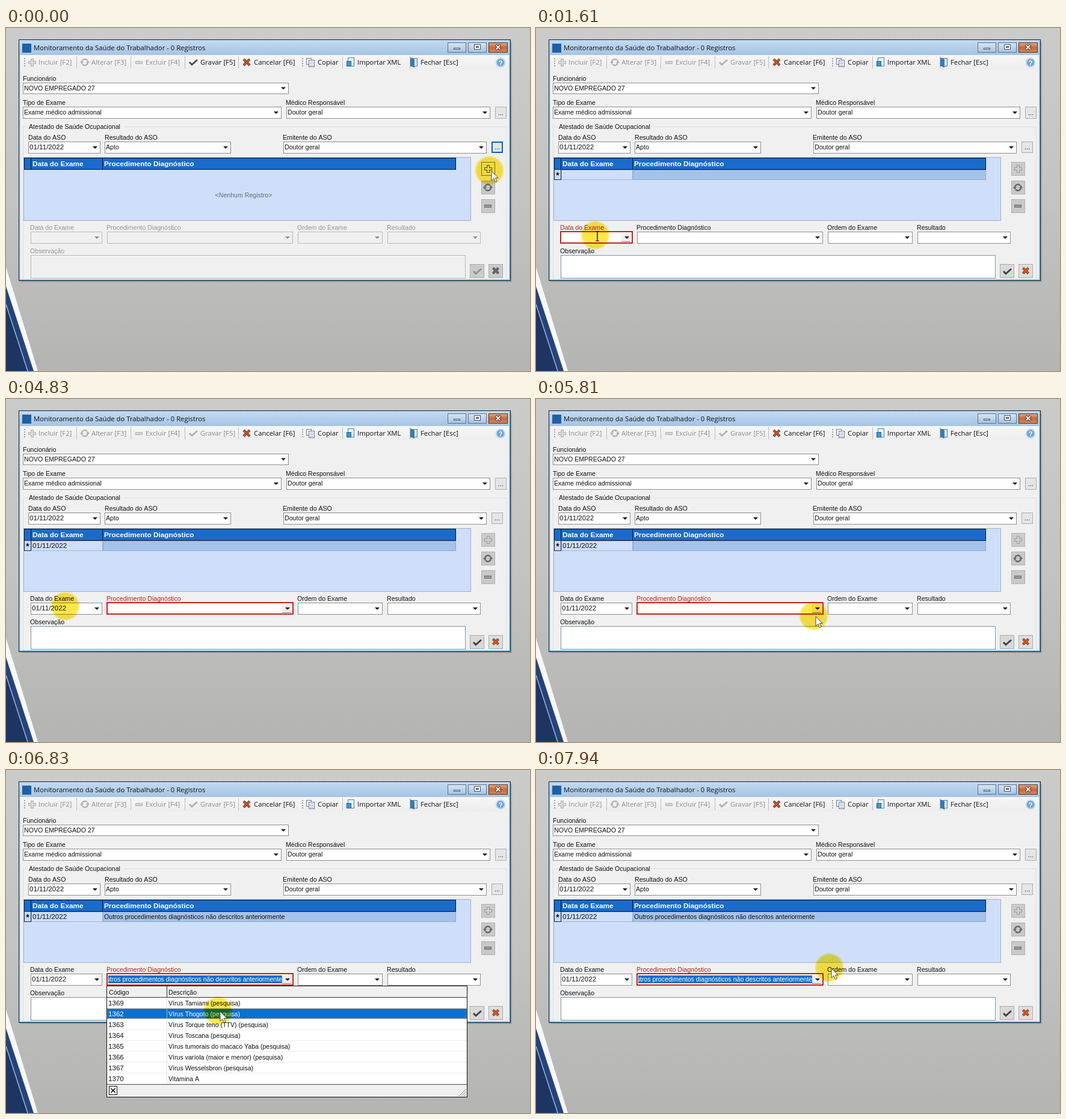
Recreate the animation shown at these times as an HTML page with a canvas. Size 871 by 571 pixels, loop 8000 ms.

```html
<!DOCTYPE html>
<html lang="pt-BR">
<head>
<meta charset="utf-8">
<title>Saúde do Trabalhador</title>
<style>
html, body { margin: 0; width: 100%; height: 100%; overflow: hidden; background: #bdbdbc; }
canvas { display: block; }
</style>
</head>
<body>
<canvas id="stage" width="871" height="571"></canvas>
<script>
const ctx = document.getElementById('stage').getContext('2d');
const LOOP = 8000;
const SANS = '"Liberation Sans", Arial, sans-serif';
const FORM = '10.6px ' + SANS;
const NUM = '11.6px ' + SANS;
const BOLD = 'bold 11.8px ' + SANS;
const UI = '11.3px "Open Sans", "Noto Sans", sans-serif';
const EMPLOYEE = 'NOVO EMPREGADO 27';
const DOCTOR = 'Doutor geral';
const DATE = '01/11/2022';
const EXAM = 'Outros procedimentos diagnósticos não descritos anteriormente';
const RED = '#c9201c';
const LABEL_RED = '#b3221f';
const SELECTED = '#0b70d0';

// Moments of the story, in ms
const ADD = 80, FOCUS = 1000, TYPING = 1680, TAB = 4830, OPEN = 6150, CLOSE = 7520;
const BLINK = 530;
const KEYS = [TYPING, 2310, 2870, 3290, 3430, 3640, 3990, 4270, 4340, 4410];
// Pointer tip: time, x, y
const PATH = [
  [0, 807, 238], [130, 807, 238], [420, 46, 399], [500, 52, 393],
  [FOCUS, 102, 346], [5330, 102, 346], [5700, 450, 373], [5810, 465, 362],
  [5960, 468, 352], [6200, 468, 352], [6780, 356, 402], [7100, 356, 402],
  [7440, 464, 352], [7660, 467, 348], [7940, 491, 330], [LOOP, 495, 328]
];
const ROWS = [
  ['1369', 'Vírus Tamiami (pesquisa)'],
  ['1362', 'Vírus Thogoto (pesquisa)'],
  ['1363', 'Vírus Torque teno (TTV) (pesquisa)'],
  ['1364', 'Vírus Toscana (pesquisa)'],
  ['1365', 'Vírus tumorais do macaco Yaba (pesquisa)'],
  ['1366', 'Vírus varíola (maior e menor) (pesquisa)'],
  ['1367', 'Vírus Wesselsbron (pesquisa)'],
  ['1370', 'Vitamina A']
];

function rect(x, y, w, h, fill, stroke) {
  if (fill) { ctx.fillStyle = fill; ctx.fillRect(x, y, w, h); }
  if (stroke) {
    ctx.strokeStyle = stroke;
    ctx.lineWidth = 1;
    ctx.strokeRect(x + .5, y + .5, w - 1, h - 1);
  }
}

function text(str, x, y, color = '#111', font = FORM, align = 'left') {
  ctx.font = font;
  ctx.fillStyle = color;
  ctx.textAlign = align;
  ctx.fillText(str, x, y);
}

function shape(points, fill) {
  ctx.beginPath();
  points.forEach(([x, y]) => ctx.lineTo(x, y));
  ctx.closePath();
  ctx.fillStyle = fill;
  ctx.fill();
}

function line(points, color, width = 1) {
  ctx.beginPath();
  points.forEach(([x, y]) => ctx.lineTo(x, y));
  ctx.strokeStyle = color;
  ctx.lineWidth = width;
  ctx.stroke();
}

function shade(x0, y0, x1, y1, ...colors) {
  const g = ctx.createLinearGradient(x0, y0, x1, y1);
  colors.forEach((c, i) => g.addColorStop(i / (colors.length - 1), c));
  return g;
}

function mix(a, b, k) {
  k = Math.min(1, Math.max(0, k));
  return `rgb(${a.map((v, i) => Math.round(v + (b[i] - v) * k))})`;
}

function cross(x, y, r, color, width = 3) {
  line([[x - r, y - r], [x + r, y + r]], color, width);
  line([[x - r, y + r], [x + r, y - r]], color, width);
}

function check(x, y, color) {
  line([[x - 6, y], [x - 2, y + 4], [x + 7, y - 4]], color, 3);
}

function plus(x, y, fill, edge) {
  rect(x - 6, y - 2, 13, 5, edge);
  rect(x - 2, y - 6, 5, 13, edge);
  rect(x - 5, y - 1, 11, 3, fill);
  rect(x - 1, y - 5, 3, 11, fill);
}

function minus(x, y, fill, edge) {
  rect(x - 6, y - 2, 12, 5, fill, edge);
}

function cycle(x, y, color) {
  ctx.strokeStyle = color;
  ctx.lineWidth = 2.5;
  for (const a of [.2, Math.PI + .2]) {
    ctx.beginPath();
    ctx.arc(x, y, 5, a, a + 2.2);
    ctx.stroke();
  }
  shape([[x - 8, y - 1], [x - 2, y - 1], [x - 5, y + 4]], color);
  shape([[x + 8, y + 1], [x + 2, y + 1], [x + 5, y - 4]], color);
}

function button(x, y, w, h, fill = '#c9c9c9', edge = '#b0b0b0') {
  rect(x, y, w, h, fill, edge);
}

function combo(x, y, right, value, { off, focus, font, h = 20 } = {}) {
  const w = right - x;
  rect(x, y, w, h, off ? '#f0f0f0' : '#fff', off ? '#b9b9b9' : '#8b8d92');
  if (focus) {
    rect(right - 18, y + 3, 15, h - 6, '#f0f0f0');
    line([[right - 18, y + h - 3.5], [right - 3, y + h - 3.5]], '#777');
    ctx.strokeStyle = RED;
    ctx.lineWidth = 2;
    ctx.strokeRect(x, y, w, h - 1);
  }
  const ax = right - 9, ay = y + h / 2 - 1;
  shape([[ax - 4, ay - 1], [ax + 4, ay - 1], [ax, ay + 3]], off ? '#8c8c8c' : '#111');
  if (value) text(value, x + 2, y + h / 2 + 3, '#111', font);
}

function backdrop() {
  rect(0, 0, 871, 571, shade(0, 0, 0, 571, '#cbcbca', '#c3c3c2', '#b4b4b3'));
  shape([[0, 398], [53, 571], [0, 571]], '#f7f8fa');
  shape([[0, 430], [46, 571], [0, 571]], '#24437c');
  line([[0, 460], [36, 571]], '#a9b8d2', 1.5);
  shape([[0, 463], [35, 571], [0, 571]], '#1d3562');
}

function frame() {
  rect(24, 23, 817, 400, 'rgba(0,0,0,.14)');
  rect(21, 19, 818, 402, '#b5d0ec', '#17202a');
  rect(22, 20, 816, 25, shade(0, 20, 0, 45, '#c3daf2', '#a5c4e4'));
  rect(24, 45, 812, 373, '#f0f0f0');
  line([[837.5, 20], [837.5, 419.5], [22, 419.5]], '#55bfe5');
  rect(27, 26, 15, 15, '#1f5fa6');
  text('Monitoramento da Saúde do Trabalhador - 0 Registros', 46, 37, '#111', UI);

  for (const x of [734, 768]) {
    rect(x, 24, 31, 17, shade(0, 24, 0, 41, '#d8e7f7', '#a4c1e0'), '#5d7188');
  }
  rect(802, 24, 32, 17, shade(0, 24, 0, 41, '#e2b091', '#c8683a', '#d58a5c'), '#59301f');
  rect(744, 33, 11, 3, '#fff', '#46505b');
  rect(778, 27, 11, 9, '#fff', '#46505b');
  rect(781, 30, 5, 3, '#8ca6c0', '#46505b');
  cross(818, 32, 4, '#54302a', 4);
  cross(818, 32, 3.5, '#fff', 2);
}

function toolbar(editing) {
  const off = '#8c8c8c', on = '#111';
  rect(24, 45, 812, 24, shade(0, 45, 0, 69, '#f7f7f7', '#ededed'));
  for (const x of [30, 492]) {
    for (let y = 50; y < 65; y += 4) rect(x, y, 2, 2, '#a2a2a2');
  }
  for (const x of [117, 207, 297, 386, 559, 671]) rect(x, 47, 1, 20, '#bdbdbd');

  plus(43, 57, '#d8d8d8', '#b2b2b2');
  cycle(131, 57, '#b4b4b4');
  minus(221, 57, '#d4d4d4', '#b2b2b2');
  check(311, 57, editing ? '#b2b2b2' : '#505050');
  cross(400, 57, 5, '#6e2e18', 4);
  cross(400, 57, 4.5, '#bd572c', 2.5);

  rect(499, 50, 9, 11, '#fff', '#687a91');
  rect(503, 53, 10, 12, '#f4f8fc', '#687a91');
  for (const y of [56, 59, 62]) rect(505, y, 6, 1, '#91a4ba');
  rect(568, 49, 11, 15, '#eaf5fd', '#3d83b8');
  rect(566, 55, 8, 9, '#3d98d1', '#23628e');
  rect(672, 50, 12, 14, '#dbe9f3', '#537695');
  shape([[672, 49], [679, 52], [679, 66], [672, 63]], '#397bb2');

  const items = [
    ['Incluir [F2]', 54, off], ['Alterar [F3]', 142, off], ['Excluir [F4]', 232, off],
    ['Gravar [F5]', 323, editing ? off : on], ['Cancelar [F6]', 412, on],
    ['Copiar', 518, on], ['Importar XML', 584, on], ['Fechar [Esc]', 689, on]
  ];
  items.forEach(([label, x, color]) => text(label, x, 61, color, UI));

  ctx.beginPath();
  ctx.arc(822, 57.5, 7, 0, 7);
  ctx.fillStyle = '#6ea3d6';
  ctx.fill();
  ctx.strokeStyle = '#b9d2ea';
  ctx.lineWidth = 2;
  ctx.stroke();
  text('?', 822, 61.5, '#fff', 'bold 11px ' + SANS, 'center');
}

function header(editing) {
  text('Funcionário', 28, 88);
  combo(28, 91, 470, EMPLOYEE, { h: 19 });
  text('Tipo de Exame', 28, 128);
  combo(28, 131, 458, 'Exame médico admissional');
  text('Médico Responsável', 465, 128);
  combo(466, 131, 805, DOCTOR);
  button(813, 131, 19, 20, '#e5e5e5', '#adadad');
  text('...', 822.5, 145, '#111', FORM, 'center');

  line([[35, 164.5], [28.5, 164.5], [28.5, 417]], '#dedede');
  line([[196, 164.5], [831.5, 164.5], [831.5, 417]], '#dedede');
  text('Atestado de Saúde Ocupacional', 38, 168);
  text('Data do ASO', 37, 186);
  combo(37, 189, 157, DATE, { font: NUM });
  text('Resultado do ASO', 164, 186);
  combo(164, 189, 374, 'Apto');
  text('Emitente do ASO', 460, 186);
  combo(461, 189, 799, DOCTOR);
  button(807, 189, 19, 19, '#e5e5e5', '#adadad');
  if (!editing) {
    rect(807, 189, 19, 19, '#0a62bd');
    rect(809, 191, 15, 15, '#e1e6ec');
  }
  text('...', 816.5, 202, '#111', FORM, 'center');
}

function grid(t, editing) {
  rect(29, 215, 744, 106, '#cfdffa', '#9fb1c9');
  rect(30, 216, 718, 20, '#1a6bcb', '#06132a');
  rect(41, 217, 1, 18, '#06132a');
  rect(160, 217, 1, 18, '#06132a');
  text('Data do Exame', 44, 230, '#fff', BOLD);
  text('Procedimento Diagnóstico', 163, 230, '#fff', BOLD);
  if (!editing) {
    text('<Nenhum Registro>', 395, 282, '#626b78', FORM, 'center');
    return;
  }
  rect(161, 236, 587, 17, '#a5c2eb', '#8eabd2');
  rect(42, 236, 119, 17, '#cfdffa', '#9db6d7');
  rect(30, 235, 12, 18, '#c9daf2', '#0c2d5c');
  text('*', 36, 250, '#111', 'bold 14px ' + SANS, 'center');
  if (t >= TAB) text(DATE, 44, 248, '#111', NUM);
  if (t >= OPEN) text(EXAM, 163, 248);
}

function sideButtons(editing) {
  button(790, 223, 23, 23, editing ? '#cbcbcb' : '#f0f0ec', editing ? '#b4b4b4' : '#777');
  plus(801, 234, editing ? '#d0d0d0' : '#e8e8e8', editing ? '#999' : '#555');
  button(790, 254, 23, 23);
  cycle(801, 265.5, '#666');
  button(790, 285, 23, 23);
  minus(801, 296, '#999', '#6e6e6e');
}

function caretOn(t) {
  const last = [ADD, FOCUS, ...KEYS].filter(k => k <= t).pop();
  return Math.floor((t - last) / BLINK) % 2 === 0;
}

function details(t, editing) {
  const dateFocus = editing && t < TAB;
  const examFocus = t >= TAB;
  const ink = editing ? '#111' : '#969696';
  const off = !editing;

  text('Data do Exame', 40, 336, dateFocus ? LABEL_RED : ink);
  text('Procedimento Diagnóstico', 167, 336, examFocus ? LABEL_RED : ink);
  text('Ordem do Exame', 484, 336, ink);
  text('Resultado', 633, 336, ink);
  text('Observação', 40, 375, ink);

  combo(41, 339, 160, examFocus ? DATE : '', { off, focus: dateFocus, font: NUM });
  combo(168, 339, 477, '', { off, focus: examFocus });
  combo(485, 339, 626, '', { off });
  combo(634, 339, 789, '', { off });
  rect(41, 378, 723, 39, off ? '#f0f0f0' : '#fff', off ? '#b9b9b9' : '#7f93a5');

  if (dateFocus) {
    const typed = DATE.slice(0, KEYS.filter(k => t >= k).length);
    text(typed, 43, 352, '#111', NUM);
    const x = 43 + ctx.measureText(typed).width;
    if (caretOn(t)) rect(Math.round(x), 342, 1, 13, '#111');
  }
  if (t >= OPEN) {
    rect(170, 342, 289, 13, SELECTED);
    ctx.save();
    ctx.beginPath();
    ctx.rect(170, 340, 289, 17);
    ctx.clip();
    text(EXAM, 459, 352, '#fff', FORM, 'right');
    ctx.restore();
  }

  const k = (t - 300) / 900;
  button(771, 393, 24, 23, off ? '#cbcbcb' : '#d9d9d9', '#ababab');
  check(783, 405, off ? '#929292' : mix([125, 125, 125], [65, 65, 65], k));
  button(802, 393, 24, 23, off ? '#cbcbcb' : '#dedede', '#ababab');
  cross(814, 404, 4.5, off ? '#484848' : '#60351f', 4);
  cross(814, 404, 4, off ? '#6b6b6b' : mix([164, 116, 67], [224, 83, 29], k), 2.5);
}

function list(y) {
  const hover = Math.min(7, Math.max(0, Math.floor((y - 379) / 18)));
  rect(167, 359, 600, 186, '#fff', '#111');
  rect(168, 360, 598, 19, '#f0f0f0');
  line([[168, 378.5], [766, 378.5]], '#333');
  rect(267, 360, 1, 18, '#333');
  text('Código', 171, 374);
  text('Descrição', 270, 374);
  ROWS.forEach(([code, name], i) => {
    const top = 379 + i * 18;
    const on = i === hover;
    rect(168, top + 17, 598, 1, '#ececec');
    rect(267, top, 1, 18, '#e2e2e2');
    if (on) {
      rect(168, top, 598, 17, SELECTED);
      rect(267, top, 1, 17, '#8db5e2');
      ctx.setLineDash([1, 1]);
      rect(168, top, 598, 17, null, '#d79a4b');
      ctx.setLineDash([]);
    }
    text(code, 170, top + 13, on ? '#fff' : '#111', NUM);
    text(name, 270, top + 13, on ? '#fff' : '#111');
  });
  rect(168, 523, 598, 21, '#f0f0f0');
  line([[168, 523.5], [766, 523.5]], '#555');
  rect(171, 526, 14, 15, '#fff', '#111');
  cross(178, 533.5, 3.5, '#111', 1.7);
  for (const d of [3, 7, 11]) line([[764 - d, 543], [764, 543 - d]], '#888');
}

// Speed at a path point: zero at rests and turns, so the curve never overshoots
function speed(i, axis) {
  if (i === 0 || i === PATH.length - 1) return 0;
  const slope = j => (PATH[j + 1][axis] - PATH[j][axis]) / (PATH[j + 1][0] - PATH[j][0]);
  const a = slope(i - 1), b = slope(i);
  return a * b > 0 ? 2 * a * b / (a + b) : 0;
}

function place(t) {
  let i = 0;
  while (i < PATH.length - 2 && t > PATH[i + 1][0]) i++;
  const span = PATH[i + 1][0] - PATH[i][0];
  const k = (t - PATH[i][0]) / span;
  const e = k * k * (3 - 2 * k);
  return [1, 2].map(axis => {
    const from = PATH[i][axis], to = PATH[i + 1][axis];
    const bend = k * (1 - k) * ((1 - k) * speed(i, axis) - k * speed(i + 1, axis));
    return from + (to - from) * e + span * bend;
  });
}

function glow(x, y) {
  const g = ctx.createRadialGradient(x, y, 0, x, y, 25);
  g.addColorStop(0, 'rgba(255,230,66,1)');
  g.addColorStop(.84, 'rgba(255,230,66,.95)');
  g.addColorStop(1, 'rgba(255,230,66,0)');
  ctx.globalCompositeOperation = 'multiply';
  ctx.fillStyle = g;
  ctx.fillRect(x - 25, y - 25, 50, 50);
  ctx.globalCompositeOperation = 'source-over';
}

function pointer(t, x, y) {
  glow(x - 3.5, y - 1);
  if (t >= TYPING && t < 5330) return;
  if (t >= 400 && t < TYPING) {
    line([[x, y - 7], [x, y + 8]], '#111', 1.4);
    line([[x - 3, y - 7.5], [x + 3, y - 7.5]], '#111');
    line([[x - 3, y + 8.5], [x + 3, y + 8.5]], '#111');
    return;
  }
  const arrow = [[0, 0], [0, 16], [4, 12.5], [6.5, 18.5], [9, 17.5], [6.5, 11.5], [11, 11.5]]
    .map(([dx, dy]) => [x + dx, y + dy]);
  shape(arrow, '#fff');
  line([...arrow, arrow[0]], '#4b4b4b');
}

function draw(now) {
  const t = now % LOOP;
  const editing = t >= ADD;
  const [x, y] = place(t);
  backdrop();
  frame();
  toolbar(editing);
  header(editing);
  grid(t, editing);
  sideButtons(editing);
  details(t, editing);
  if (t >= OPEN && t < CLOSE) list(y);
  pointer(t, x, y);
}

let start;
function tick(now) {
  if (start === undefined) start = now;
  draw(now - start);
  requestAnimationFrame(tick);
}
draw(0);
requestAnimationFrame(tick);
</script>
</body>
</html>
```
